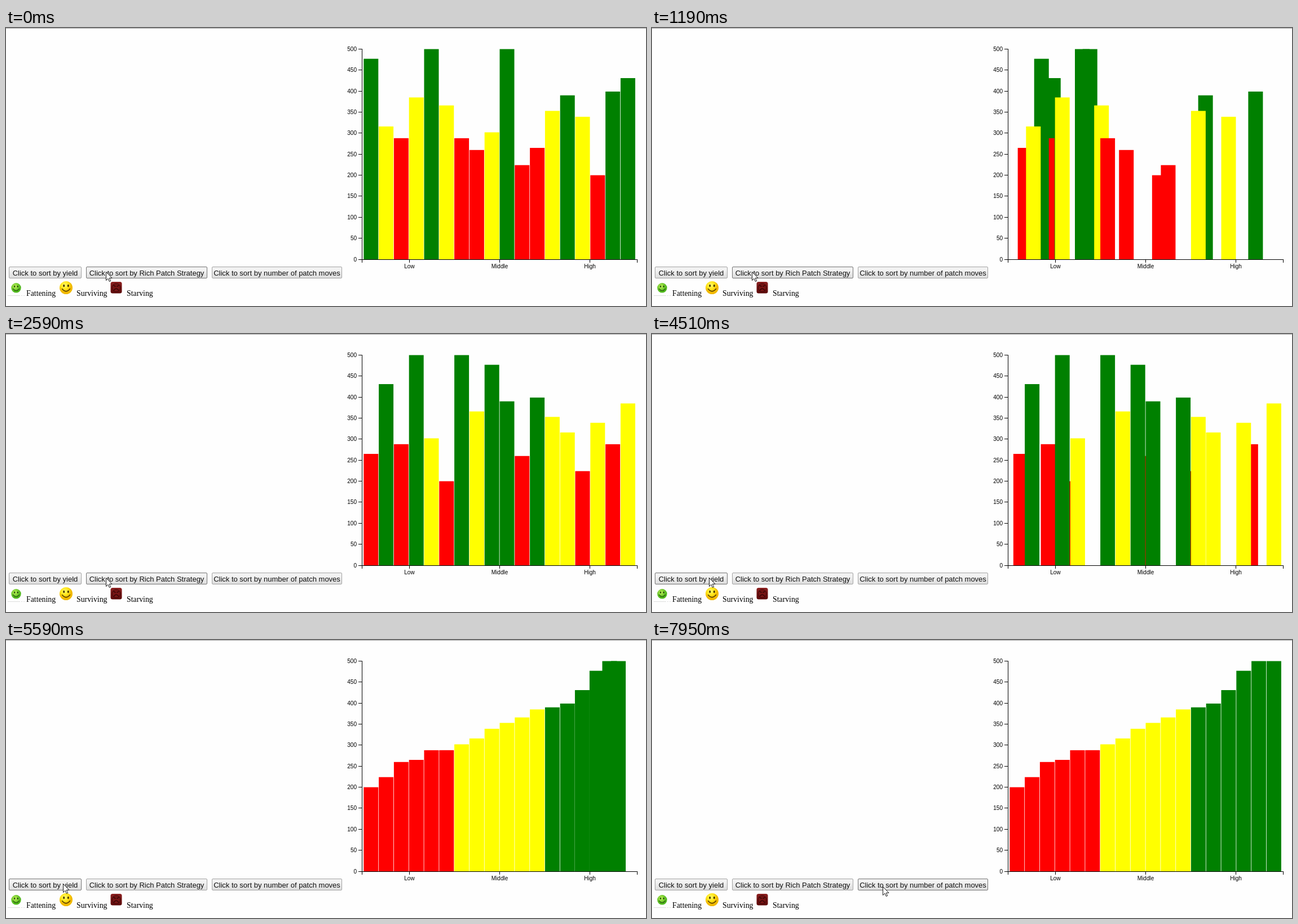
These frames come from a looping animation (1135 by 494 pixels, 8 s). An HTML page:

```html
<!DOCTYPE html>
<html lang="en">
<head>
<meta charset="utf-8">
<title>Sorting bars</title>
<style>
html, body { margin: 0; width: 100%; height: 100%; overflow: hidden; background: #fefefe; }
svg { display: block; }
text { font-family: "Liberation Sans", Arial, sans-serif; }
.axis { font-size: 10px; }
.axis path { fill: none; stroke: #000; }
.button rect { fill: url(#up); stroke: #a3a3a3; }
.button text { font-size: 13px; text-anchor: middle; fill: #111; }
.button.hover rect { stroke: #737373; }
.button.active rect { fill: url(#down); }
.legend text { font: 13.8px "Liberation Serif", "Times New Roman", serif; }
.line { fill: none; stroke-linecap: round; }
</style>
</head>
<body>
<svg width="1135" height="494" viewBox="0 0 1135 494">
  <defs>
    <linearGradient id="up" x2="0" y2="1">
      <stop offset=".3" stop-color="#f2f2f2"/><stop offset="1" stop-color="#dcdcdc"/>
    </linearGradient>
    <linearGradient id="down" x2="0" y2="1">
      <stop offset="0" stop-color="#d6d6d6"/><stop offset="1" stop-color="#ececec"/>
    </linearGradient>
    <radialGradient id="green" cx=".4" cy=".35">
      <stop offset="0" stop-color="#c5f55a"/><stop offset="1" stop-color="#4fb81c"/>
    </radialGradient>
    <radialGradient id="yellow" cx=".4" cy=".3">
      <stop offset="0" stop-color="#fff86a"/><stop offset=".6" stop-color="#ffe61a"/><stop offset="1" stop-color="#f0b800"/>
    </radialGradient>
    <linearGradient id="maroon" x2="0" y2="1">
      <stop offset="0" stop-color="#8c2020"/><stop offset="1" stop-color="#5a0808"/>
    </linearGradient>
  </defs>
  <rect width="1135" height="1" fill="#a5a5a5"/>
  <g id="bars"></g>
  <g id="axis" class="axis"></g>
  <g id="buttons"></g>
  <g class="legend">
    <path d="M3 475.5H33" stroke="#ddd" stroke-dasharray="22 2 2 2"/>
    <circle cx="18" cy="461.8" r="8.7" fill="url(#green)"/>
    <ellipse cx="15.2" cy="459.3" rx="1.2" ry="1.8" fill="#244d0a"/>
    <ellipse cx="20.8" cy="459.3" rx="1.2" ry="1.8" fill="#244d0a"/>
    <path class="line" d="M12.5 463.5Q18 470 23.5 463.5" stroke="#2c5f0e" stroke-width="1.2"/>
    <text x="36" y="476">Fattening</text>
    <circle cx="106.5" cy="461.5" r="11.5" fill="url(#yellow)"/>
    <ellipse cx="102.7" cy="458" rx="1.4" ry="2.3" fill="#3a2a00"/>
    <ellipse cx="110.3" cy="458" rx="1.4" ry="2.3" fill="#3a2a00"/>
    <path class="line" d="M99.5 463.5Q106.5 472 113.5 463.5" stroke="#4a3500" stroke-width="1.3"/>
    <text x="125" y="476">Surviving</text>
    <rect x="185.5" y="451" width="20" height="20.5" rx="3.5" fill="url(#maroon)"/>
    <circle cx="195.5" cy="461.3" r="7.3" fill="#761414" stroke="#3f0505"/>
    <path class="line" d="M191 457.5l3 1.6M200 457.5l-3 1.6M191.5 465.8Q195.5 460.5 199.5 465.8" stroke="#2c0303" stroke-width="1.4"/>
    <text x="214" y="476">Starving</text>
  </g>
  <g id="cursor">
    <g id="ring" fill="none"><circle r="9" stroke="#fff"/><circle r="10" stroke="#000"/></g>
    <path d="M.5 .5V15.5L4 12.2L6.3 17.5L8.6 16.5L6.3 11.3H11Z" fill="#fff" stroke="#000" stroke-width=".9"/>
  </g>
</svg>
<script>
const LOOP = 8000, BASE = 411, UNIT = 0.747;
const values = [477, 316, 288.1, 385, 500, 366, 288, 260, 302, 500, 224, 265, 353, 390, 339, 200, 399, 431];
const initial = values.map((_, i) => i);
const byStrategy = [11, 17, 2, 9, 8, 15, 4, 5, 0, 13, 7, 16, 12, 1, 10, 14, 6, 3];
const byYield = [...initial].sort((a, b) => values[a] - values[b]);

// Each sort maps page time to its own clock, which runs slightly unevenly.
const sorts = [
  { from: initial, to: byStrategy, clock: [[410, 0], [1190, 770], [2210, 1850]] },
  { from: byStrategy, to: byYield, clock: [[4090, 0], [4510, 423], [4990, 973], [5590, 1626], [5800, 1850]] },
];
const pointer = [
  [2590, 177, 433], [3180, 101, 433], [6400, 101, 433], [6580, 160, 400], [6750, 260, 389],
  [6950, 370, 410], [7110, 410, 443], [7220, 410, 443], [7280, 409, 438],
];
const presses = [[240, 380], [3860, 4070], [7660, 7900]];
const STEP = 60;

const $ = id => document.getElementById(id);
const mix = (a, b, p) => a + (b - a) * p;
const clamp = v => Math.min(1, Math.max(0, v));
const cubic = p => p < 0.5 ? 4 * p ** 3 : 1 - 4 * (1 - p) ** 3;
const slotX = i => 634.3 + 26.8 * i;

function add(parent, tag, attrs, text = '') {
  const node = document.createElementNS('http://www.w3.org/2000/svg', tag);
  for (const name in attrs) node.setAttribute(name, attrs[name]);
  node.textContent = text;
  return parent.appendChild(node);
}

// Linear interpolation through [time, ...values] keys, held at both ends.
function track(keys, t) {
  let i = 0;
  while (i < keys.length - 2 && t >= keys[i + 1][0]) i++;
  const [a, b] = [keys[i], keys[i + 1]];
  const p = clamp((t - a[0]) / (b[0] - a[0]));
  return a.slice(1).map((v, k) => mix(v, b[k + 1], p));
}

const bars = values.map((v, i) => add($('bars'), 'rect', {
  x: slotX(i), y: BASE - v * UNIT, width: 26, height: v * UNIT,
  fill: v < 300 ? 'red' : v < 387 ? 'yellow' : 'green',
}));

let axisPath = 'M631.5 37V412M631 411.5H1119.5';
for (let v = 0; v <= 500; v += 50) {
  const y = Math.floor(BASE - v * UNIT) + 0.5;
  axisPath += `M625 ${y}H631`;
  add($('axis'), 'text', { x: 622, y: y + 3.5, 'text-anchor': 'end' }, v);
}
for (const x of [631, 715, 875, 1035, 1119]) axisPath += `M${x + 0.5} 411V417`;
add($('axis'), 'path', { d: axisPath });
['Low', 'Middle', 'High'].forEach((label, i) =>
  add($('axis'), 'text', { x: 715.5 + 160 * i, y: 427, 'text-anchor': 'middle' }, label));

const buttons = [
  [5, 134, 'Click to sort by yield'],
  [142, 357, 'Click to sort by Rich Patch Strategy'],
  [365, 596, 'Click to sort by number of patch moves'],
].map(([left, right, label]) => {
  const node = add($('buttons'), 'g', { class: 'button' });
  add(node, 'rect', { x: left + 0.5, y: 424.5, width: right - left - 1, height: 20, rx: 1.5 });
  add(node, 'text', { x: (left + right) / 2, y: 440 }, label);
  return { left, right, node };
});

let shownOrder = initial;

function drawBars(t) {
  const { from, to, clock } = sorts[t < sorts[1].clock[0][0] ? 0 : 1];
  const start = clock[0][0];
  const [elapsed] = track(clock, start + Math.floor((t - start) / STEP) * STEP);
  if (shownOrder !== to) {
    to.forEach(id => $('bars').append(bars[id]));
    shownOrder = to;
  }
  to.forEach((id, i) => {
    const p = cubic(clamp((elapsed - 50 * i) / 1000));
    bars[id].setAttribute('x', mix(slotX(from.indexOf(id)), slotX(i), p));
  });
}

function drawPointer(t) {
  const [x, y] = track(pointer, t).map(Math.round);
  const pressed = presses.some(([down, up]) => t >= down && t < up);
  $('cursor').setAttribute('transform', `translate(${x} ${y})`);
  $('ring').style.display = pressed ? '' : 'none';
  for (const { left, right, node } of buttons) {
    const hover = x >= left && x < right && y >= 424 && y < 445;
    node.classList.toggle('hover', hover);
    node.classList.toggle('active', hover && pressed);
  }
}

function frame() {
  const t = performance.now() % LOOP;
  drawBars(t);
  drawPointer(t);
  requestAnimationFrame(frame);
}
frame();
</script>
</body>
</html>
```
